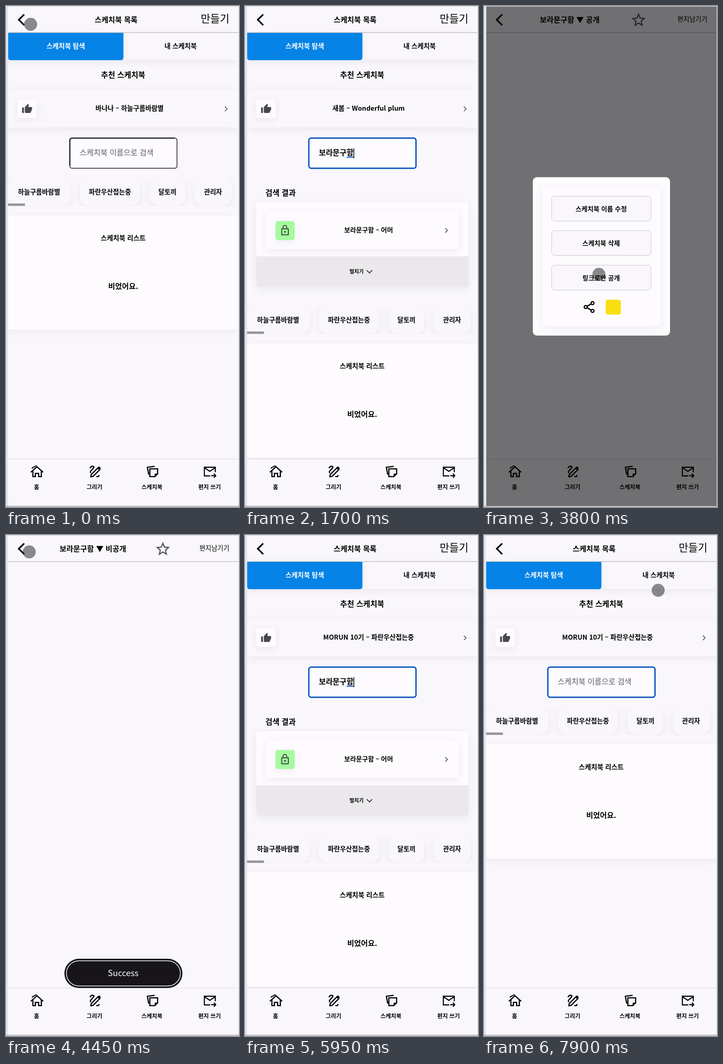
An HTML page that plays this animation: 511 px wide and 1096 px high, repeating every 8 s.

```html
<!DOCTYPE html>
<html lang="ko">
<head>
<meta charset="utf-8">
<style>
html, body { margin: 0; width: 100%; height: 100%; overflow: hidden; background: #f9f7fb }
svg { display: block; width: 511px; height: 1096px; font: 700 16px "Noto Sans CJK KR", "Noto Sans CJK JP", "Noto Sans CJK", sans-serif }
text { white-space: pre }
.soft { filter: drop-shadow(0 4px 8px rgba(40, 30, 60, .07)) }
.line { fill: none; stroke: #000; stroke-width: 2.6 }
.thin { font-weight: 500 }
</style>
</head>
<body>
<svg id="stage" viewBox="0 0 511 1096"></svg>
<script>
const PAGE = '#f9f7fb', CARD = '#fdfbfe', LOOP = 8000;
const BOOK = '보라문구함';

const rect = (x0, y0, x1, y1, r, fill, more = '') =>
  `<rect x="${x0}" y="${y0}" width="${x1 - x0}" height="${y1 - y0}" rx="${r}" fill="${fill}" ${more}/>`;
const text = (s, x, y, size, more = '') =>
  `<text x="${x}" y="${y + size * .37}" font-size="${size}" text-anchor="middle" ${more}>${s}</text>`;
const path = (d, more = 'class="line"') => `<path d="${d}" ${more}/>`;
const group = (id, body, more = '') => `<g id="${id}" ${more}>${body}</g>`;
const soft = 'class="soft"', thin = 'class="thin"';
const chevron = (d) => path(d, 'fill="none" stroke="#444" stroke-width="1.6"');

const thumb = path('M1 21h4V9H1v12zm22-11c0-1.1-.9-2-2-2h-6.31l.95-4.57.03-.32c0-.41-.17-.79-.44-1.06L14.17 1 7.59 7.59C7.22 7.95 7 8.45 7 9v10c0 1.1.9 2 2 2h9c.83 0 1.54-.5 1.84-1.22l3.02-7.05c.09-.23.14-.47.14-.73v-2z',
  'fill="#4a484c" transform="translate(34.3 213)"');
const star = path('M22 9.24l-7.19-.62L12 2 9.19 8.63 2 9.24l5.46 4.73L5.82 21 12 17.27 18.18 21l-1.63-7.03L22 9.24zM12 15.4l-3.76 2.27 1-4.28-3.32-2.88 4.38-.38L12 6.1l1.71 4.04 4.38.38-3.32 2.88 1 4.28L12 15.4z',
  'id="star" fill="#555358"');

const chips = [[4, 141, 72.5, '하늘구름바람별'], [162, 294, 228, '파란우산접는중'], [315, 393, 354, '달토끼'], [414, 495, 454, '관리자']]
  .map(([a, b, c, s]) => rect(a, 377, b, 437, 20, PAGE, soft) + text(s, c, 407, 14.4)).join('');

const below = group('below',
  `<g clip-path="url(#strip)">${chips}${rect(4, 432, 41.5, 437.5, 0, '#979599')}</g>` +
  rect(4.5, 458, 510, 708, 5, CARD, soft) +
  text('스케치북 리스트', 257, 508, 14.7) + text('비었어요.', 257, 613, 16.4));

const results = text('검색 결과', 78, 409, 16.8) + group('hit',
  rect(25, 429, 490, 614.5, 6, CARD, soft) +
  rect(46, 449, 469, 532, 4, CARD, soft) +
  rect(67, 470.5, 109, 512, 5, '#a5fb9f', soft) +
  path('M80.5 487.5h14.500v13h-14.500zM83.500 487v-3a4 4 0 0 1 8 0v3', 'fill="none" stroke="#3b453b" stroke-width="2"') +
  '<circle cx="87.7" cy="494" r="2" fill="#3b453b"/>' +
  text(BOOK + ' – 어머', 271, 490, 14.2) + chevron('M439 486l5 5-5 5') +
  path('M25 547.500H490V608.500a6 6 0 0 1-6 6H31a6 6 0 0 1-6-6z', 'fill="#eae8eb"') +
  text('펼치기', 244.5, 581, 11.3) + path('M267 578l6 6 6-6', 'fill="none" stroke="#444" stroke-width="2"'));

const list = group('list',
  text('스케치북 목록', 241.5, 30, 16.2) + text('만들기', 458.5, 28, 22.8, thin) +
  rect(258, 58.5, 510, 118, 4, PAGE, soft) +
  path('M4.500 58.500H257.500V113a5.500 5.500 0 0 1-5.500 5.500H10a5.500 5.500 0 0 1-5.500-5.500z', 'fill="#0583e6" class="soft"') +
  text('스케치북 탐색', 131, 88, 14.6, 'fill="#fff"') + text('내 스케치북', 383, 88, 14.5) +
  text('추천 스케치북', 257, 151, 16.7) +
  rect(4.5, 183, 510, 266, 4, PAGE, soft) +
  rect(25, 204, 67, 245, 5, CARD, soft) + thumb +
  text('', 271, 224, 14.5, 'id="pick"') + chevron('M480 220l5 5-5 5') +
  group('results', results) + below +
  rect(140, 289, 375, 355, 5, CARD, 'id="box"') +
  group('bevel', path('M140 350V294a5 5 0 0 1 5-5H370', 'fill="none" stroke="#1c1b1f" stroke-width="2.6"') +
    path('M370 289a5 5 0 0 1 5 5V350a5 5 0 0 1-5 5H145a5 5 0 0 1-5-5', 'fill="none" stroke="#656368" stroke-width="2.4"')) +
  text('스케치북 이름으로 검색', 242.5, 321, 16.6, 'id="hint" class="thin" fill="#5c5a60"') +
  '<text id="query" x="162" y="327.3" font-size="16.5"></text>' +
  rect(0, 330, 15, 332, 0, '#0b62d6', 'id="under"') + rect(0, 311, 1.6, 333, 0, '#000', 'id="caret"'));

const detail = group('detail',
  text('', 188, 30, 16.4, 'id="title"') + star + text('편지남기기', 457, 29, 14.3, thin));

const nav = rect(5, 991, 510, 1094, 0, PAGE) + rect(5, 990.5, 510, 991.5, 0, '#dad8dd') +
  path('M54.500 1020L68 1008l13.500 12M59 1017v12.500h5.500v-7h7v7h6V1017') +
  path('M57.500 1012c0-4 3-2 5-4s2-2 5-2', 'class="line" style="stroke-width:2.2"') +
  path('M184 1011q3-5 7-4t-1 6-5 6 1 3M186 1030l1-5 15-15 4 4-15 15zM198 1029q6 2 6-3', 'class="line" stroke-linejoin="round"') +
  path('M200 1011l4-4 4 4-4 4z', '') +
  path('M315.500 1012.500h17v11l-6 6h-11zM313 1025l-3-16 16-2') + path('M326 1031v-8h8z', '') +
  path('M448 1028h-13v-19h24v11M435 1010l12 8 12-8M450 1027.500h9M456 1023l4 4.500-4 4.500', 'class="line" style="stroke-width:2.3"') +
  [['홈', 67], ['그리기', 194], ['스케치북', 320], ['편지 쓰기', 446.5]].map(([s, x]) => text(s, x, 1052, 12.5)).join('');

const option = (s, y0, y1) =>
  rect(148.5, y0, 366, y1, 6, PAGE, 'stroke="#c6c4c9"') + text(s, 257, (y0 + y1) / 2, 14.2);
const modal = group('modal',
  rect(5, 1, 510, 1094, 0, '#000', 'opacity=".55"') +
  rect(107, 374.5, 408, 721, 9, CARD) + rect(128, 395, 387, 700, 4, CARD, soft) +
  option('스케치북 이름 수정', 416, 470.5) + option('스케치북 삭제', 491.5, 545.5) + option('링크로만 공개', 567, 621.5) +
  path('M238 650L223 658.500l15 8.500') +
  [[238, 650], [223, 658.5], [238, 667]].map(([x, y]) =>
    `<circle cx="${x}" cy="${y}" r="3.300" fill="${CARD}" stroke="#000" stroke-width="2.400"/>`).join('') +
  rect(267, 642.5, 300, 675, 5, '#fade0e'));

const toast = group('toast',
  rect(128, 927, 387, 991, 32, '#17151a') +
  rect(132.5, 931.5, 382.5, 986.5, 27.5, 'none', 'stroke="#fff" stroke-width="1.5"') +
  text('Success', 257, 958, 18.4, 'fill="#fff" font-weight="400"'));

const $ = id => document.getElementById(id);
$('stage').innerHTML =
  `<clipPath id="strip">${rect(4, 377, 510, 437.5, 0, '#000')}</clipPath>` +
  rect(0, 0, 511, 1096, 0, PAGE) + rect(0, 0, 4.5, 1096, 0, '#e2e6f1') + list + detail +
  path('M40 18.500L28 30l12 12', 'class="line" style="stroke-width:3.5"') + rect(5, 57.7, 510, 58.7, 0, '#a9a7ac') +
  nav + modal + toast +
  rect(0, 0, 4.5, 1096, 0, '#e2e6f1') + rect(510, 0, 511, 1096, 0, '#d6d7de') +
  rect(0, 0, 511, 1.3, 0, '#d0d4e0') + rect(0, 1093.6, 511, 1095, 0, '#99979c') +
  '<circle id="cursor" r="14.300" fill="#000" fill-opacity=".45"/>';

// Hangul composition, one entry per keystroke
const strokes = ['ㅂ', '보', '볼', '보라', '보람', '보라무', '보라문', '보라문ㄱ', '보라문구', '보라문궇', '보라문구하', BOOK];
const erasing = ['보라문구하', '보라문구ㅎ', '보라문구', '보라문', '보라', '보', ''];
const keysAt = (words, start, gap) => words.map((s, i) => [start + i * gap, s]);
const typed = [[0, ''], ...keysAt(strokes, 800, 80), [4550, ''], ...keysAt(strokes, 5150, 70), ...keysAt(erasing, 7000, 60)];

const route = [[0, 54, 40], [120, 54, 40], [450, 257, 322], [1750, 257, 322], [2000, 339, 500], [2570, 339, 500],
  [2700, 222, 76], [2800, 213, 30], [3150, 213, 30], [3650, 252, 587], [3950, 252, 587], [4400, 51, 37],
  [4680, 51, 37], [5000, 257, 322], [7500, 257, 322], [7800, 372, 138], [7900, 382, 121], [LOOP, 382, 121]];

const within = (t, a, b) => t >= a && t < b;
const clamp = v => Math.max(0, Math.min(1, v));
const show = (id, on) => $(id).style.display = on ? '' : 'none';
const set = (id, attrs) => { for (const k in attrs) $(id).setAttribute(k, attrs[k]); };

function draw(t) {
  const onDetail = within(t, 2250, 4550);
  show('list', !onDetail);
  show('detail', onDetail);
  show('modal', within(t, 3000, 3900));

  const hidden = t >= 3900;
  $('title').textContent = `${BOOK} ▼ ${hidden ? '비공개' : '공개'}`;
  set('title', { x: hidden ? 190.5 : 188 });
  set('star', { transform: `translate(${hidden ? 325.4 : 320.4} 12) scale(1.55)` });
  set('toast', { opacity: clamp((t - 4000) / 200) * clamp((5150 - t) / 200) });

  $('pick').textContent = t < 850 ? '바나나 – 하늘구름바람별'
    : t < 4550 ? '새봄 – Wonderful plum' : 'MORUN 10기 – 파란우산접는중';

  const [since, query] = typed.filter(k => k[0] <= t).pop();
  const match = query && BOOK.startsWith(query);
  const focused = within(t, 500, 4550) || t >= 5050;
  show('results', query);
  show('hit', match);
  set('below', { transform: `translate(0 ${match ? 280 : query ? 100 : 0})` });
  show('bevel', !focused);
  set('box', { stroke: focused ? '#0a53bd' : 'none', 'stroke-width': 3 });
  show('hint', !query);
  $('query').textContent = query;
  if (!onDetail) {
    const width = query ? $('query').getComputedTextLength() : 0;
    const last = query ? width / query.length : 0;
    set('under', { x: 162 + width - last, width: last });
    set('caret', { x: 162 + width });
  }
  show('caret', focused && (t - since) % 1000 < 500);

  const i = route.findIndex(p => p[0] > t);
  const [t0, x0, y0] = route[i - 1], [t1, x1, y1] = route[i];
  const f = (t - t0) / (t1 - t0);
  set('cursor', { cx: x0 + (x1 - x0) * f, cy: y0 + (y1 - y0) * f });
  show('cursor', !within(t, 800, 1750) && !within(t, 5150, 7500));
}

const start = performance.now();
function tick() {
  draw((performance.now() - start) % LOOP);
  requestAnimationFrame(tick);
}
tick();
</script>
</body>
</html>
```
